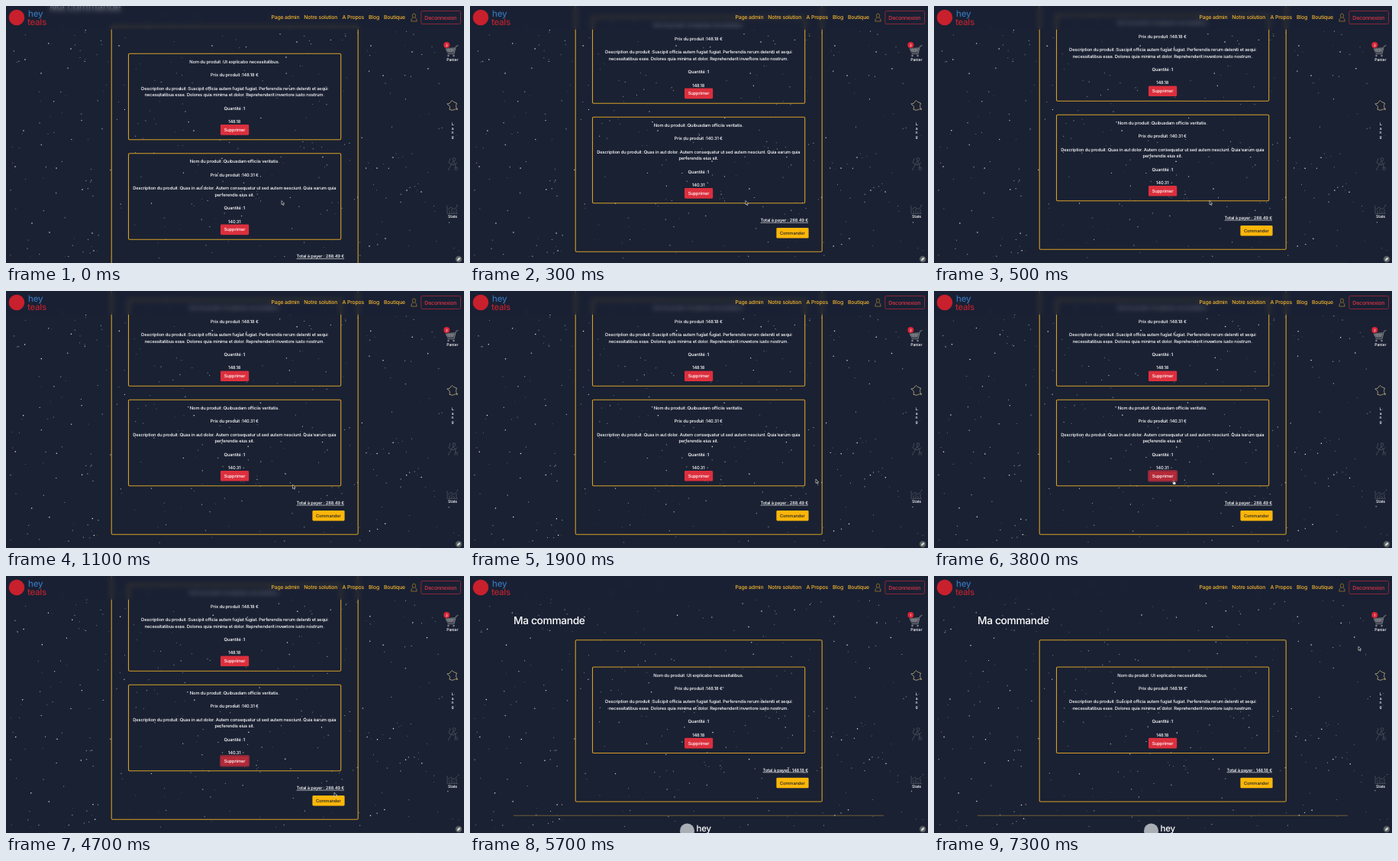
Write an HTML page with a canvas that moves like this. It is 600 by 336 pixels and loops after 7.4 s.

```html
<!DOCTYPE html>
<html lang="fr">
<head>
<meta charset="utf-8">
<title>Ma commande</title>
<style>
  html, body { margin: 0; width: 100%; height: 100%; overflow: hidden; background: #1a2133; }
  #stage { position: relative; width: 600px; height: 336px; overflow: hidden; background: #1a2133; }
  #stage > * { position: absolute; left: 0; top: 0; }
  svg text { font-family: Inter, "Open Sans", sans-serif; font-weight: 500; letter-spacing: -.025em; text-rendering: geometricPrecision; }
  #blur { width: 600px; height: 31px; background: rgba(26, 33, 51, .55); backdrop-filter: blur(3px); }
  .gold { fill: none; stroke: #d6a026; }
</style>
</head>
<body>
<div id="stage">
  <canvas id="sky" width="600" height="336"></canvas>
  <svg id="page" width="600" height="336"></svg>
  <div id="blur"></div>
  <svg id="chrome" width="600" height="336"></svg>
</div>
<script>
const LOOP = 7400, RELOAD = 5000, PITCH = 130.5;
const byId = id => document.getElementById(id);

// Text is placed by its vertical middle.
const text = (x, mid, str, { size = 5.8, fill = '#fff', anchor = 'middle', more = '' } = {}) =>
  `<text x="${x}" y="${mid + size * .36}" font-size="${size}" fill="${fill}" text-anchor="${anchor}" ${more}>${str}</text>`;
const box = (x, y, w, h, attrs) => `<rect x="${x}" y="${y}" width="${w}" height="${h}" ${attrs}/>`;

const products = [
  { name: 'Ut explicabo necessitatibus.', price: '148.18', lines: [
    'Suscipit officia autem fugiat fugiat. Perferendis rerum deleniti et sequi',
    'necessitatibus esse. Dolores quia minima et dolor. Reprehenderit inventore iusto nostrum.'] },
  { name: 'Quibusdam officiis veritatis.', price: '140.31', lines: [
    'Quas in aut dolor. Autem consequatur ut sed autem nesciunt. Quia earum quia',
    'perferendis eius sit.'] }
];

function card({ name, price, lines }, index) {
  const top = 119 + index * PITCH;
  return box(160.5, top, 278.2, 112.5, 'rx="1.5" class="gold" stroke-width="1.1"') +
    text(299.3, top + 10.5, 'Nom du produit :' + name) +
    text(299.3, top + 28, `Prix du produit :${price} €`) +
    text(299.3, top + 45.3, 'Description du produit :' + lines[0]) +
    text(299.3, top + 54, lines[1]) +
    text(299.3, top + 71.3, 'Quantité :1') +
    text(299.3, top + 88.7, price) +
    box(281, top + 92.8, 37.2, 13.6, `id="delete${index}" rx="1.4" fill="#dc2f3d"`) +
    text(299.5, top + 99.6, 'Supprimer');
}

function order(count, total) {
  const extra = (count - 1) * PITCH;
  return text(57, 57.8, 'Ma commande', { size: 13.75, anchor: 'start' }) +
    box(138.2, 83.8, 323, 211.2 + extra, 'rx="1.5" class="gold" stroke-width="1.1"') +
    products.slice(0, count).map(card).join('') +
    text(443, 253.5 + extra, `Total à payer : ${total} €`, { anchor: 'end', more: 'text-decoration="underline"' }) +
    box(401.4, 263.8 + extra, 42.2, 13.5, 'rx="1.4" fill="#fcb60a"') +
    text(422.3, 270.6 + extra, 'Commander', { fill: '#212529' }) +
    `<path d="M57 ${313.2 + extra}H542" stroke="#94783a" stroke-width=".7"/>` +
    `<circle cx="284.5" cy="${333 + extra}" r="9.5" fill="#a9adb4"/>` +
    text(296.5, 330 + extra, 'hey', { size: 11.5, anchor: 'start' });
}

byId('page').innerHTML =
  `<g id="two">${order(2, '288.49')}</g><g id="one">${order(1, '148.18')}</g>`;

const links = [[347.5, 'Page admin'], [390.3, 'Notre solution'], [440.5, 'A Propos'], [475, 'Blog'], [495, 'Boutique']];
byId('chrome').innerHTML =
  '<circle cx="14" cy="15" r="10.3" fill="#c8202c"/>' +
  text(29, 10.2, 'hey', { size: 11.5, fill: '#3672b5', anchor: 'start' }) +
  text(28, 20.5, 'teals', { size: 11.5, fill: '#b9222e', anchor: 'start' }) +
  links.map(([x, label]) => text(x, 15, label, { size: 6.9, fill: '#f4b530', anchor: 'start' })).join('') +
  `<g class="gold" stroke-width=".55"><ellipse cx="534.5" cy="12.7" rx="2.1" ry="2.7"/>
    <path d="M533 15.2Q530.8 16 530.8 20H538.2Q538.2 16 536 15.2"/></g>` +
  box(543.8, 6.5, 51.7, 17, 'rx="1.8" fill="none" stroke="#b92b3b" stroke-width=".7"') +
  text(569.3, 15, 'Deconnexion', { size: 7, fill: '#dc3545' }) +
  `<path d="M592.5 51.5l-3 1-2.5 10h-8.5" fill="none" stroke="#8a8c90" stroke-width=".9"/>
   <path d="M575.5 55.5L588.5 54l-2 7h-8.5z" fill="#62656c"/>
   <path d="M576.5 57.5h11M580 55.5l1 5M584 55l-.5 5.5" stroke="#90939a" stroke-width=".5"/>
   <circle cx="579.5" cy="65" r="1.3" fill="#7d8087"/><circle cx="586.5" cy="65" r="1.3" fill="#7d8087"/>
   <circle cx="577.3" cy="51" r="4" fill="#d92535"/>` +
  text(577.4, 51, '2', { size: 4.6, more: 'id="badge"' }) +
  text(584.8, 70, 'Panier', { size: 5.2 }) +
  `<path d="M584.5 123.5l2 2 4 1.5-1 3.5 1 4-3 .8-2.5 1-4-1 .5-4-3.7-3.3 3.2-.6 1-1.5z"
     fill="none" stroke="#dcc48c" stroke-width=".7"/><path d="M591 134v2" stroke="#dcc48c"/>` +
  [...'Lang'].map((letter, i) => text(585, 154 + i * 5.8, letter, { size: 5 })).join('') +
  `<g fill="none" stroke="#4b505c" stroke-width=".9"><circle cx="587" cy="200.5" r="1.9"/>
     <path d="M586 203l-3 5-4 7M586 203l3 5-1 7M581 206l5 2 5-3M582 199l-2 7M588 211h3v4"/></g>
   <path d="M578 261V271.5H592M581 271v-4M584 271v-6M587 271v-3M590 271v-6M579 266l4-3 4 3 4-4"
     fill="none" stroke="#555a65" stroke-width=".7"/>` +
  text(585, 275.5, 'Stats', { size: 5.2 }) +
  `<circle cx="593" cy="331" r="4.2" fill="#5b5f63"/>
   <path d="M591 333.2Q590.8 329.3 595.3 328.8Q595 333 591 333.2" fill="#d5d8d5"/>
   <g id="cursor">
     <path id="arrow" d="M0 0V5.2L1.2 4.2 2.1 6.1 3 5.7 2.2 3.8H3.7Z" fill="#111" stroke="#fff" stroke-width=".55"/>
     <path id="hand" d="M-.5 .2Q0-.5 .5 .2V2L2.8 2.7 2.5 5.4H-.5L-2 3.1-1.4 2.7-.5 3.3Z" fill="#fff" stroke="#222" stroke-width=".4"/>
     <path id="beam" d="M-1.2-3Q0-3 0-2.2Q0-3 1.2-3M0-2.2V2.2M-1.2 3Q0 3 0 2.2Q0 3 1.2 3" fill="none" stroke="#ddd" stroke-width=".7"/>
   </g>`;

// Seeded stars, each with its own slow drift.
let seed = 41;
const random = () => (seed = seed * 16807 % 2147483647) / 2147483647;
const bright = [[25, 70], [85, 56], [46, 88], [148, 52], [270, 52], [381, 47], [367, 67], [478, 52],
  [494, 91], [532, 60], [553, 82], [23, 163], [12, 210], [66, 212], [100, 240], [57, 296], [113, 297], [34, 284],
  [115, 320], [486, 212], [525, 241], [507, 198], [544, 243], [476, 314], [497, 304], [366, 239], [246, 163], [317, 203]];
const star = (x, y, size, alpha) =>
  ({ x, y, size, alpha, vx: (random() - .5) * .8, vy: (random() - .5) * .8 });
const stars = bright.map(([x, y]) => star(x, y, .75, .9));
for (let i = 0; i < 330; i++)
  stars.push(star(5 + random() * 588, 8 + random() * 324, .35 + random() * .35, .3 + random() * .6));

const sky = byId('sky').getContext('2d');
function drawSky(seconds) {
  sky.clearRect(0, 0, 600, 336);
  sky.fillStyle = '#fff';
  for (const s of stars) {
    sky.globalAlpha = s.alpha;
    sky.beginPath();
    sky.arc(s.x + s.vx * seconds, s.y + s.vy * seconds, s.size, 0, 7);
    sky.fill();
  }
}

const pointer = [[0, 361, 254.5], [900, 361, 254.5], [1700, 453, 246], [2200, 453, 246], [2900, 314, 247.5],
  [3800, 314, 247.5], [4600, 430, 283], [4800, 430, 283], [5400, 417, 253.5], [6000, 417, 253.5], [6900, 556, 92], [LOOP, 556, 92]];

function pointerAt(t) {
  const i = Math.max(1, pointer.findIndex(step => step[0] > t));
  const [t0, x0, y0] = pointer[i - 1], [t1, x1, y1] = pointer[i];
  const p = (t - t0) / (t1 - t0), eased = p * p * (3 - 2 * p);
  return [x0 + (x1 - x0) * eased, y0 + (y1 - y0) * eased];
}

const show = (id, on) => byId(id).setAttribute('visibility', on ? 'visible' : 'hidden');

function render(t) {
  const reloaded = t >= RELOAD;
  const scroll = 107.3 - 50.8 * (1 - Math.min(t / 400, 1)) ** 2;
  byId('two').setAttribute('transform', `translate(0 ${-scroll})`);
  show('two', !reloaded);
  show('one', reloaded);
  byId('badge').textContent = reloaded ? '1' : '2';

  const over = t > 2750 && t < 3950, pressed = t >= 3500;
  const button = byId('delete1');
  button.setAttribute('fill', pressed ? '#b52a39' : over ? '#d12c3a' : '#dc2f3d');
  button.setAttribute('stroke', pressed ? '#8a2a3a' : 'none');
  button.setAttribute('stroke-width', 1.8);

  const beam = t > 5250 && t < 6150;
  byId('cursor').setAttribute('transform', `translate(${pointerAt(t)})`);
  show('hand', over);
  show('beam', beam);
  show('arrow', !over && !beam);
  drawSky(t / 1000);
}

const start = performance.now();
function tick() {
  render((performance.now() - start) % LOOP);
  requestAnimationFrame(tick);
}
tick();
</script>
</body>
</html>
```
